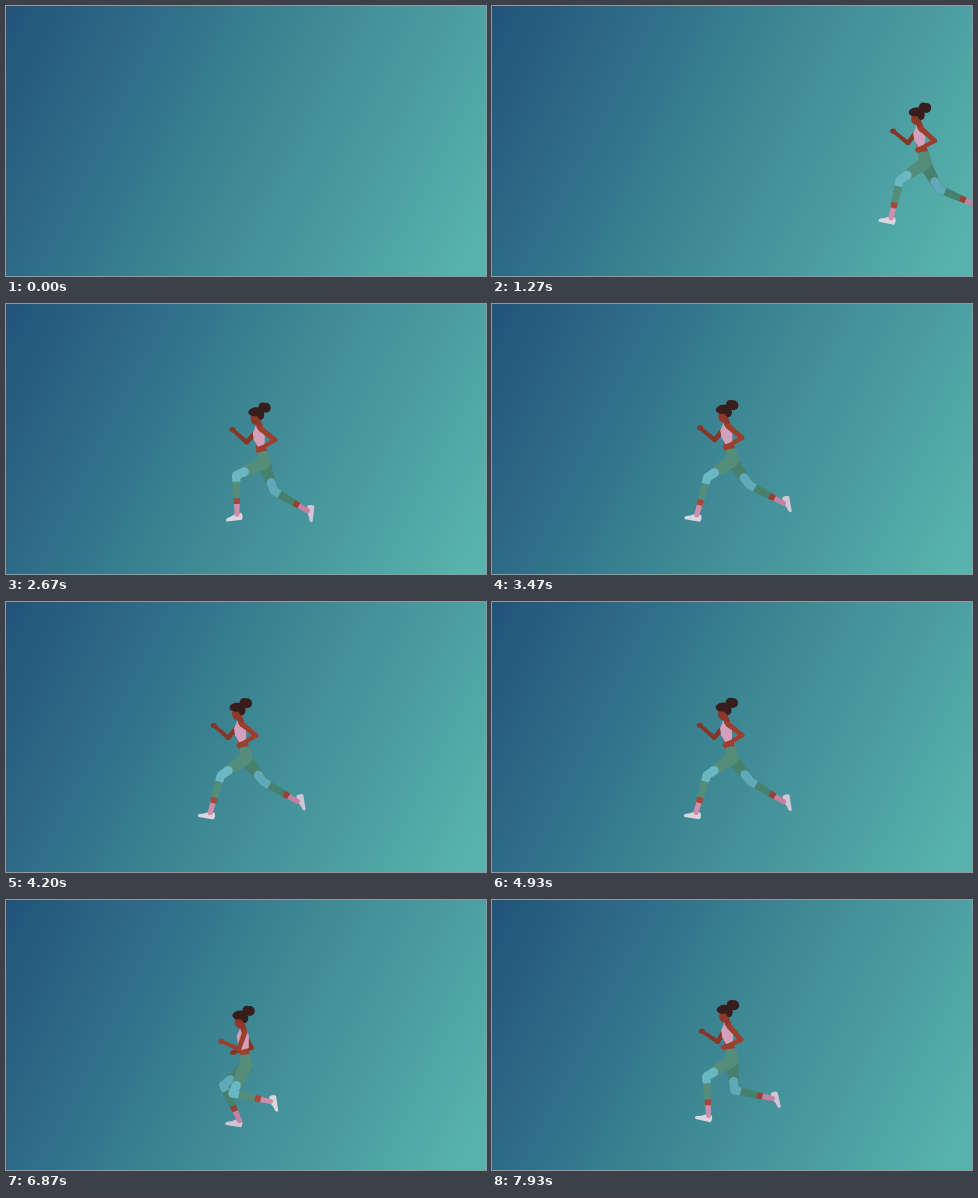
Recreate the animation shown at these times as an HTML page with a canvas. Size 480 px wide and 270 px high, loop 8000 ms.

```html
<!DOCTYPE html>
<html lang="en">
<head>
<meta charset="utf-8">
<title>Runner</title>
<style>
  html, body { margin: 0; width: 100%; height: 100%; overflow: hidden; }
  body { background: linear-gradient(117deg, #22537a 0%, #2f6e89 26%, #3f8a95 52%, #4b9da1 74%, #58b3ac 96%); }
  canvas { display: block; width: 480px; height: 270px; }
</style>
</head>
<body>
<canvas id="stage" width="480" height="270"></canvas>
<script>
const ctx = document.getElementById('stage').getContext('2d');
const { sin, cos, PI, hypot, atan2, sqrt, exp, log, min, max } = Math;
const LOOP = 8000, TICK = 1000 / 15, STRIDE = 737, WIDEST = 4200;
const THIGH = 29, SHIN = 36, UPPER_ARM = 18, FOREARM = 19;

const near = { skin: '#9c3f2d', green: '#548e7b', blue: '#6ab7c6', red: '#a8463a', sock: '#d08cab', shoe: '#dcd5e0' };
const far = { skin: '#863627', green: '#48806e', blue: '#5fa9b9', red: '#984036', sock: '#c481a0', shoe: '#cfc7d6' };
const HAIR = '#381d1d', FACE = '#8e382a', SHIRT = '#d0a0bc';

const mix = (a, b, k) => a.map((v, i) => v + (b[i] - v) * k);
const rad = degrees => degrees * PI / 180;
// a point at a given angle from straight down, positive towards the back
const hang = ([x, y], length, angle) => [x + length * sin(angle), y + length * cos(angle)];

// constant speed that melts into running on the spot
function travel(time) {
  const speed = .135, arrive = 2696, soft = 170;
  return speed * soft * log(1 + exp((arrive - time) / soft));
}

// all poses follow the stride angle a, zero when that leg is furthest forward
const ankleAt = a => [
  247 - 34 * cos(a) - 8 * cos(3 * a) + 8 * sin(a),
  210 + 7 * sin(a) + 5 * cos(a) - 7 * cos(2 * a)
];
const footTilt = a => rad(45 - 58 * cos(a - .35));

function bunAt(a) {
  const lift = cos(2 * a + .2);
  return [242.5 - 2.5 * lift, 109 - 9 * lift];
}

function shape(color, points) {
  ctx.fillStyle = color;
  ctx.beginPath();
  points.forEach(p => ctx.lineTo(...p));
  ctx.fill();
}

function oval(color, x, y, rx, ry = rx, turn = 0) {
  ctx.fillStyle = color;
  ctx.beginPath();
  ctx.ellipse(x, y, rx, ry, turn, 0, PI * 2);
  ctx.fill();
}

function limb(color, a, b, wa, wb, round = true) {
  const angle = atan2(b[1] - a[1], b[0] - a[0]);
  const nx = -sin(angle) / 2, ny = cos(angle) / 2;
  const edge = (p, w) => [p[0] + nx * w, p[1] + ny * w];
  shape(color, [edge(a, wa), edge(b, wb), edge(b, -wb), edge(a, -wa)]);
  if (round) {
    oval(color, ...a, wa / 2);
    oval(color, ...b, wb / 2);
  }
}

function kneeOf(hip, ankle) {
  const dx = ankle[0] - hip[0], dy = ankle[1] - hip[1];
  const d = hypot(dx, dy), reach = min(d, THIGH + SHIN);
  const along = (THIGH ** 2 - SHIN ** 2 + reach ** 2) / (2 * reach);
  const out = sqrt(max(0, THIGH ** 2 - along ** 2));
  return [hip[0] + (dx * along - dy * out) / d, hip[1] + (dy * along + dx * out) / d];
}

function drawShoe(color, [x, y], tilt) {
  ctx.save();
  ctx.translate(x, y);
  ctx.rotate(-tilt);
  ctx.fillStyle = color;
  ctx.beginPath();
  ctx.moveTo(4, 2);
  ctx.lineTo(-2, 2);
  ctx.quadraticCurveTo(-6, 5, -11, 6);
  ctx.quadraticCurveTo(-13, 8, -11, 9);
  ctx.lineTo(4, 9);
  ctx.quadraticCurveTo(6, 6, 4, 2);
  ctx.fill();
  ctx.restore();
}

function drawLeg(c, hip, a) {
  const ankle = ankleAt(a), knee = kneeOf(hip, ankle);
  const onShin = k => mix(knee, ankle, k);
  drawShoe(c.shoe, ankle, footTilt(a));
  limb(c.sock, onShin(.78), onShin(1.08), 5.5, 5);
  limb(c.green, knee, onShin(.68), 8.5, 6.5, false);
  limb(c.red, onShin(.64), onShin(.8), 6.5, 6, false);
  limb(c.green, hip, knee, 13, 8.5);
  limb(c.blue, mix(hip, knee, .7), knee, 9, 8.5);
  limb(c.blue, knee, onShin(.18), 8.5, 8, false);
}

function drawArm(c, shoulder, a) {
  const back = cos(a + .3);
  const elbow = hang(shoulder, UPPER_ARM, rad(5 + 48 * back));
  const hand = hang(elbow, FOREARM, rad(-95 + 37 * back));
  limb(c.skin, shoulder, elbow, 5.5, 4.5);
  limb(c.skin, elbow, hand, 4.5, 3.5);
  oval(c.skin, ...hand, 3, 2.6);
}

function drawTorso([sx, sy], [hx, hy]) {
  limb(near.skin, [sx - 1, sy + 12], [hx, hy - 8], 9, 10);
  shape(near.green, [[hx - 5, hy - 12], [hx + 5, hy - 13], [hx + 8, hy], [hx + 4, hy + 5], [hx - 6, hy + 4]]);
  shape(SHIRT, [[sx - 5, sy - 3], [sx + 2, sy - 3], [sx + 4, sy + 4], [sx + 4, sy + 16],
    [sx - 3, sy + 18], [sx - 7, sy + 11], [sx - 8, sy + 4]]);
}

function drawHead(x, y) {
  limb(FACE, [x - 7, y + 13], [x - 5, y + 20], 5, 6);
  oval(FACE, x - 9, y + 11, 5, 7, .15);
  oval(HAIR, x - 9, y + 5, 7.5, 4.5, -.1);
  oval(HAIR, x - 4, y + 8, 3.5, 5);
  oval(HAIR, x - 2, y, 4.3);
  oval(HAIR, x + 1, y + 1, 5);
}

function render(time) {
  const a = 2 * PI * (time - WIDEST) / STRIDE;
  const [x, y] = bunAt(a);
  const hip = [239, y + 57], shoulder = [x - 4, y + 22];

  ctx.clearRect(0, 0, 480, 270);
  ctx.save();
  ctx.translate(travel(time), 0);
  drawArm(far, [shoulder[0] - 2, shoulder[1]], a + PI);
  drawLeg(far, [hip[0] + 1, hip[1]], a + PI);
  drawLeg(near, hip, a);
  drawTorso(shoulder, hip);
  drawHead(x, y);
  drawArm(near, shoulder, a);
  ctx.restore();
}

function play() {
  const time = performance.now() % LOOP;
  render(Math.floor((time + 4) / TICK) * TICK);
  requestAnimationFrame(play);
}
play();
</script>
</body>
</html>
```
